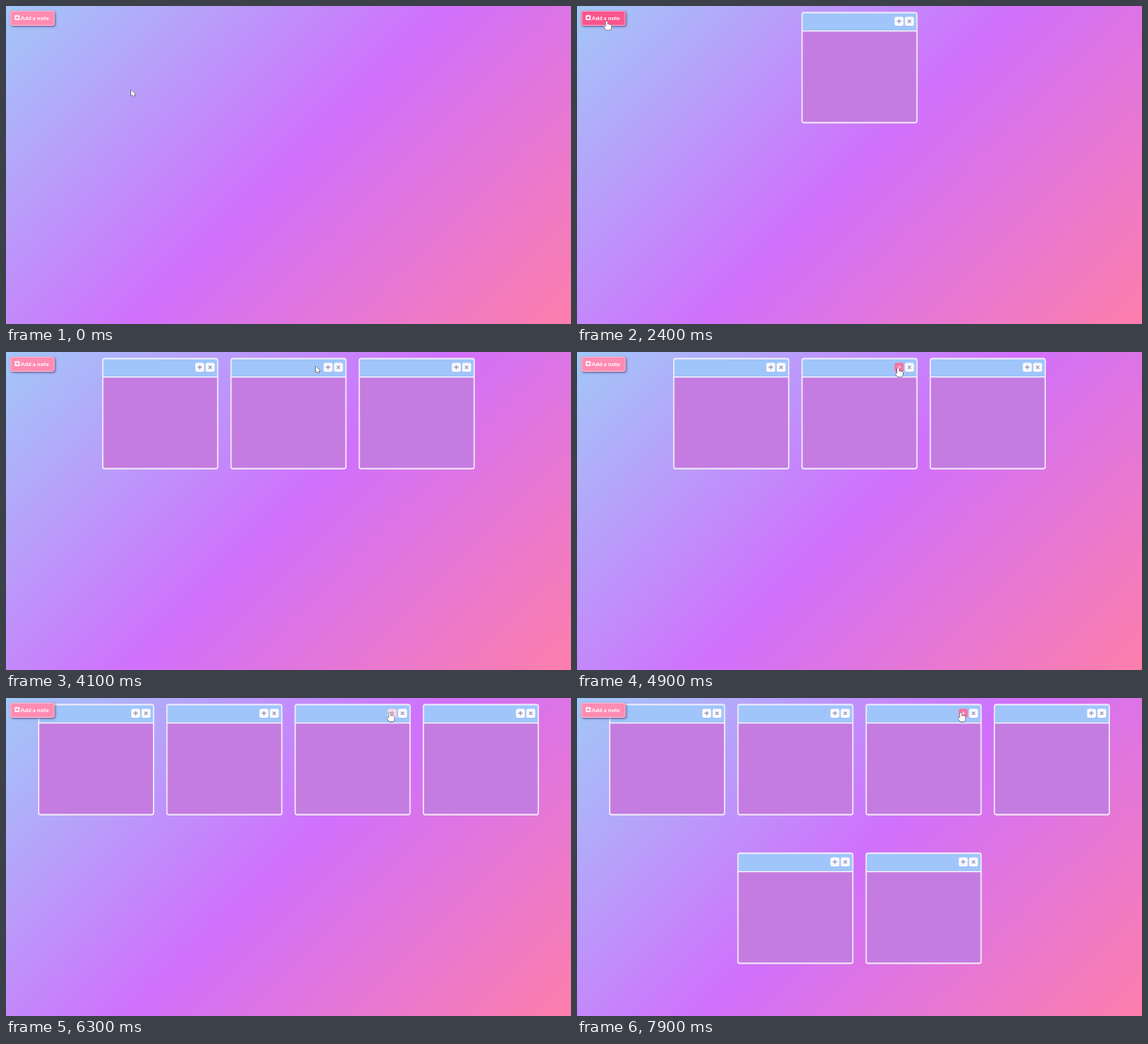
An HTML page with a canvas for the animation above (8 s loop, 600x338 px).

```html
<!DOCTYPE html>
<html lang="en">
<head>
<meta charset="utf-8">
<title>Notes board</title>
<style>
  html, body { margin: 0; width: 100%; height: 100%; overflow: hidden; }
  canvas { display: block; width: 600px; height: 338px; }
</style>
</head>
<body>
<canvas id="stage" width="600" height="338"></canvas>
<script>
const ctx = document.getElementById('stage').getContext('2d');
const LOOP = 8000;
const NOTE = { w: 122, h: 117, top: 7, header: 19.5, pitchX: 136.2, pitchY: 158, perRow: 4 };
const ADDED_AT = [1700, 2500, 3200, 5150, 6900, 7500];
const HAND_TIMES = [[900, 3530], [4210, 5150], [6180, LOOP]];
// Pointer tip: time, x, y
const PATH = [
  [500, 133, 89], [930, 31.5, 16], [3450, 31.5, 16],
  [4100, 329, 15], [4280, 341, 17], [5400, 341, 17], [6230, 407.5, 15.5]
];

const arrow = new Path2D('M0 0V6.7L1.6 5.3 2.6 7.7 3.8 7.2 2.8 4.9H4.9Z');
const hand = new Path2D('M-1 .5Q0-.6 1 .5V3.5L2 3.2 3 3.7 4 3.7 5 4.5V7L4 9.6H-.4L-3 6Q-3 4.5-1 6Z');

const background = ctx.createLinearGradient(65.5, -65.5, 534.5, 403.5);
background.addColorStop(0, '#a2c8f8');
background.addColorStop(0.5, '#d070fc');
background.addColorStop(1, '#fd7eab');

const clamp = v => Math.max(0, Math.min(1, v));
const ramp = (t, start, length = 400) => clamp((t - start) / length);
const ease = p => p * p * (3 - 2 * p);
const mix = (a, b, p) => `rgb(${a.map((v, i) => Math.round(v + (b[i] - v) * p))})`;

function box(x, y, w, h, r, fill, stroke, lineWidth = 1) {
  ctx.beginPath();
  ctx.roundRect(x, y, w, h, r);
  ctx.fillStyle = fill;
  ctx.fill();
  if (stroke) {
    ctx.strokeStyle = stroke;
    ctx.lineWidth = lineWidth;
    ctx.stroke();
  }
}

function plus(x, y, r, color, angle = 0) {
  ctx.save();
  ctx.translate(x, y);
  ctx.rotate(angle);
  ctx.beginPath();
  ctx.moveTo(-r, 0);
  ctx.lineTo(r, 0);
  ctx.moveTo(0, -r);
  ctx.lineTo(0, r);
  ctx.strokeStyle = color;
  ctx.lineWidth = 1.2;
  ctx.stroke();
  ctx.restore();
}

function noteButton(x, y, angle, hover) {
  box(x - 4.7, y - 4.7, 9.4, 9.4, 1.6, mix([250, 250, 255], [246, 112, 158], hover));
  plus(x, y, 2.3, mix([160, 157, 178], [250, 190, 212], hover), angle);
}

function drawNote(x, y, hover) {
  box(x, y, NOTE.w, NOTE.h, 2, '#c47ce0');
  box(x, y, NOTE.w, NOTE.header, [2, 2, 0, 0], '#9fc5fa');
  ctx.fillStyle = '#f4eefc';
  ctx.fillRect(x, y + NOTE.header - 0.5, NOTE.w, 1.2);
  ctx.beginPath();
  ctx.roundRect(x, y, NOTE.w, NOTE.h, 2);
  ctx.strokeStyle = '#f6f0fd';
  ctx.lineWidth = 1.3;
  ctx.stroke();
  noteButton(x + 103, y + 9.2, 0, hover);
  noteButton(x + 114, y + 9.2, Math.PI / 4, 0);
}

function drawNotes(t) {
  const count = ADDED_AT.filter(at => t >= at).length;
  const hovers = [0, ramp(t, 4230) - ramp(t, 5200), ramp(t, 6200)];
  for (let i = 0; i < count; i++) {
    const row = Math.floor(i / NOTE.perRow);
    const inRow = Math.min(NOTE.perRow, count - row * NOTE.perRow);
    const column = i % NOTE.perRow;
    const center = 300 + (column - (inRow - 1) / 2) * NOTE.pitchX;
    drawNote(center - NOTE.w / 2, NOTE.top + row * NOTE.pitchY, hovers[i] || 0);
  }
}

function drawAddButton(t) {
  const color = mix([255, 139, 178], [250, 85, 142], ramp(t, 900) - ramp(t, 3530));
  ctx.save();
  ctx.shadowColor = 'rgba(50, 20, 70, .6)';
  ctx.shadowBlur = 2.5;
  ctx.shadowOffsetX = ctx.shadowOffsetY = 1;
  box(4.5, 5, 47, 16, 2, color);
  ctx.restore();
  box(5, 5.5, 46, 15, 1.8, color, 'rgba(255, 205, 225, .75)', 0.8);
  box(9.3, 9.8, 5.2, 5.2, 0.8, '#fff');
  plus(11.9, 12.4, 1.5, color);
  ctx.fillStyle = '#fff';
  ctx.font = 'bold 6.2px Lato, sans-serif';
  ctx.textBaseline = 'alphabetic';
  ctx.fillText('Add a note', 15.5, 15);
}

function pointerAt(t) {
  const next = PATH.findIndex(p => p[0] > t);
  if (next === 0) return PATH[0].slice(1);
  if (next < 0) return PATH.at(-1).slice(1);
  const [t0, x0, y0] = PATH[next - 1];
  const [t1, x1, y1] = PATH[next];
  const p = ease((t - t0) / (t1 - t0));
  return [x0 + (x1 - x0) * p, y0 + (y1 - y0) * p];
}

function drawPointer(t) {
  const isHand = HAND_TIMES.some(([from, to]) => t >= from && t < to);
  const shape = isHand ? hand : arrow;
  ctx.save();
  ctx.translate(...pointerAt(t));
  ctx.lineJoin = 'round';
  ctx.lineWidth = 1;
  ctx.strokeStyle = '#4a4058';
  ctx.stroke(shape);
  ctx.fillStyle = '#fff';
  ctx.fill(shape);
  ctx.restore();
}

function draw(now) {
  const t = now % LOOP;
  ctx.fillStyle = background;
  ctx.fillRect(0, 0, 600, 338);
  drawNotes(t);
  drawAddButton(t);
  drawPointer(t);
  requestAnimationFrame(draw);
}

requestAnimationFrame(draw);
</script>
</body>
</html>
```
